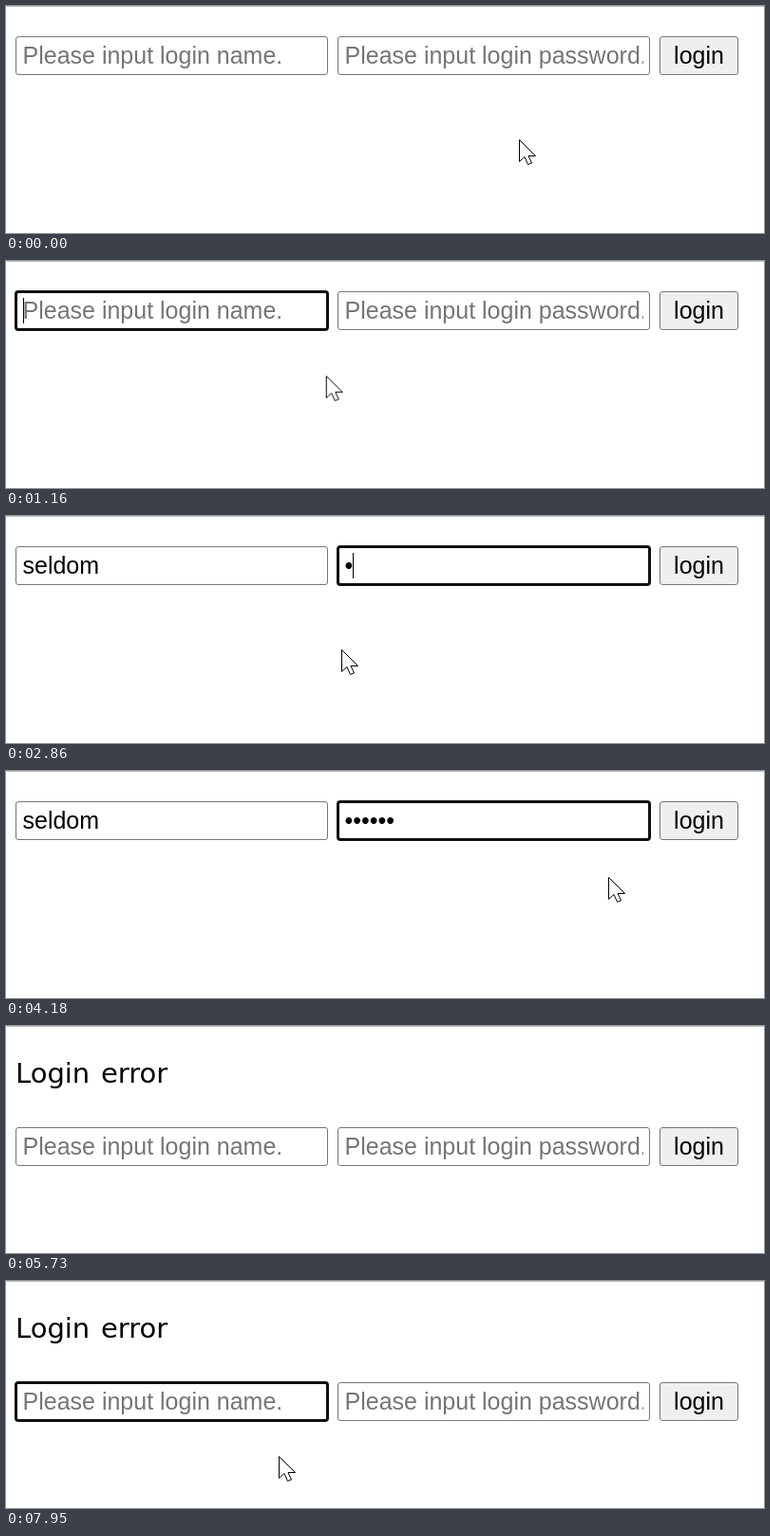
Animation, 798 px wide and 240 px high, one loop 8 s. Source, as an HTML page:

```html
<!DOCTYPE html>
<html lang="en">
<head>
<meta charset="utf-8">
<title>Login form</title>
<style>
html, body { margin: 0; width: 100%; height: 100%; overflow: hidden; background: #fff; }
body { position: relative; font: 25px/29px "Liberation Sans", Arial, sans-serif; color: #000; }
body * { animation: 8s step-end infinite; }
.line { position: absolute; top: 0; left: 0; width: 100%; height: 1px; background: #c4c4c4; }
.error {
  position: absolute; left: 10px; top: 33px; margin: 0; opacity: 0;
  font: 29px/35px "DejaVu Sans", Verdana, sans-serif; word-spacing: 2.5px;
  white-space: nowrap; animation-name: error;
}
.form { position: absolute; inset: 0; animation-name: form; }
.box {
  position: absolute; top: 32px; width: 329px; height: 41px;
  box-sizing: border-box; border: 1px solid #767676; border-radius: 3px;
}
.name { left: 10px; animation-name: name-hover; }
.pass { left: 349px; }
.button {
  left: 688px; width: 83px; background: #efefef;
  line-height: 39px; text-align: center; animation-name: button;
}
.ring { position: absolute; inset: -2px; border: 3px solid #101010; border-radius: 4px; opacity: 0; }
.hint, .typed {
  position: absolute; left: 6.5px; top: 5px; width: 314.5px;
  overflow: hidden; white-space: nowrap;
}
.hint { color: #757575; }
.typed { width: 0; }
.caret { position: absolute; left: 7px; top: 6px; width: 1px; height: 27px; background: #000; opacity: 0; }
.name .ring { animation-name: name-ring; }
.name .hint { animation-name: name-hint; }
.name .typed { animation-name: name-type; }
.name .caret { animation-name: name-caret; }
.pass .ring { animation-name: pass-ring; }
.pass .hint { animation-name: pass-hint; }
.pass .typed { animation-name: pass-type; }
.pass .caret { animation-name: pass-caret; }
.pointer {
  position: absolute; left: 0; top: 0; width: 1px; height: 1px; overflow: visible;
  animation-name: pointer;
}
.arrow { animation-name: arrow; }
.beam { opacity: 0; animation-name: beam; }
.click { opacity: 0; animation-name: click; }

@keyframes error { 71.625%, 100% { opacity: 1; } }
@keyframes form {
  65.875% { opacity: 0; }
  71.625%, 100% { opacity: 1; transform: translateY(75px); }
}
@keyframes name-hover {
  0%, 12.75% { border-color: #767676; }
  7.71% { border-color: #333; }
}
@keyframes button {
  0%, 59.25%, 100% { background: #efefef; border-color: #767676; }
  55%, 58.375% { background: #e5e5e5; border-color: #4f4f4f; }
  57.5% { background: #f5f5f5; border-color: #8d8d8d; }
}
@keyframes name-ring {
  0%, 32.375% { opacity: 0; }
  11%, 92.5%, 100% { opacity: 1; }
}
@keyframes name-hint {
  0%, 65.875%, 100% { opacity: 1; }
  23.875% { opacity: 0; }
}
@keyframes name-type {
  0%, 65.875%, 100% { width: 0; }
  23.875% { width: 12.5px; }
  24.75% { width: 26.4px; }
  25.625% { width: 32px; }
  28.125% { width: 45.9px; }
  29% { width: 59.8px; }
  29.875% { width: 82px; }
}
@keyframes name-caret {
  0%, 17.875% { opacity: 0; transform: none; }
  11% { opacity: 1; transform: none; }
  23.875% { opacity: 1; transform: translateX(12px); }
  24.75% { opacity: 1; transform: translateX(26px); }
  25.625% { opacity: 1; transform: translateX(32px); }
  28.125% { opacity: 1; transform: translateX(46px); }
  29% { opacity: 1; transform: translateX(60px); }
  29.875% { opacity: 1; transform: translateX(80px); }
  32.375% { opacity: 0; transform: none; }
  92.5% { opacity: 1; transform: none; }
  99.375%, 100% { opacity: 0; transform: none; }
}
@keyframes pass-ring {
  0%, 57.5%, 100% { opacity: 0; }
  32.375% { opacity: 1; }
}
@keyframes pass-hint {
  0%, 65.875%, 100% { opacity: 1; }
  35.75% { opacity: 0; }
}
@keyframes pass-type {
  0%, 65.875%, 100% { width: 0; }
  35.75% { width: .35em; }
  36.625% { width: .7em; }
  37.375% { width: 1.05em; }
  39.875% { width: 1.4em; }
  41.5% { width: 2.1em; }
}
@keyframes pass-caret {
  0%, 57.5%, 100% { opacity: 0; transform: none; }
  32.375% { opacity: 1; transform: none; }
  35.75% { opacity: 1; transform: translateX(8px); }
  36.625% { opacity: 1; transform: translateX(17px); }
  37.375% { opacity: 1; transform: translateX(26px); }
  39.875% { opacity: 1; transform: translateX(35px); }
  41.5% { opacity: 1; transform: translateX(52px); }
  48.125% { opacity: 0; transform: translateX(52px); }
  55% { opacity: 1; transform: translateX(52px); }
}
@keyframes pointer {
  0% { transform: translate(540px, 141px); }
  2.5% { transform: translate(540px, 141px); animation-timing-function: steps(2, start); }
  4.25% { transform: translate(500px, 128px); animation-timing-function: steps(3, start); }
  6.875% { transform: translate(360px, 84px); animation-timing-function: steps(3, start); }
  9.375% { transform: translate(288px, 62px); }
  12.75% { transform: translate(288px, 62px); animation-timing-function: steps(4, start); }
  16.25% { transform: translate(353px, 141px); }
  48.125% { transform: translate(353px, 141px); animation-timing-function: steps(2, start); }
  49.75% { transform: translate(410px, 139px); animation-timing-function: steps(4, start); }
  53% { transform: translate(634px, 112px); animation-timing-function: steps(3, start); }
  56% { transform: translate(746px, 54px); opacity: 1; }
  57.5% { transform: translate(740px, 45px); opacity: 1; }
  59.25% { transform: translate(330px, 240px); opacity: 0; }
  84.875% { transform: translate(330px, 240px); opacity: 1; animation-timing-function: steps(7, start); }
  91% { transform: translate(286px, 132px); opacity: 1; }
  93.375% { transform: translate(286px, 160px); }
  94.25% { transform: translate(285px, 183px); }
  95.125%, 100% { transform: translate(287px, 185px); opacity: 1; }
}
@keyframes arrow {
  0%, 12.75%, 93.375%, 100% { opacity: 1; }
  7.71%, 89.25% { opacity: 0; }
}
@keyframes beam {
  0%, 12.75%, 93.375%, 100% { opacity: 0; }
  7.71%, 89.25% { opacity: 1; }
}
@keyframes click {
  0%, 11.875%, 59.25%, 93.375%, 100% { opacity: 0; }
  10.25%, 57.5%, 91.625% { opacity: .58; }
}
</style>
</head>
<body>
<div class="line"></div>
<p class="error">Login error</p>
<div class="form">
  <div class="box name">
    <div class="hint">Please input login name.</div>
    <div class="typed">seldom</div>
    <div class="ring"></div>
    <div class="caret"></div>
  </div>
  <div class="box pass">
    <div class="hint">Please input login password.</div>
    <div class="typed">••••••</div>
    <div class="ring"></div>
    <div class="caret"></div>
  </div>
  <div class="box button">login</div>
</div>
<svg class="pointer">
  <circle class="click" cx="-2.5" r="17.5" fill="#fff000"/>
  <path class="arrow" d="M.5 .5V23.5L6 18.5 9.5 26.5 13.5 25 10 17.5H17.5Z" fill="#fff" stroke="#000"/>
  <path class="beam" d="M-6-11H7M0-11V11M-6 11H7" fill="none" stroke="#000" stroke-width="2"/>
</svg>
</body>
</html>
```
